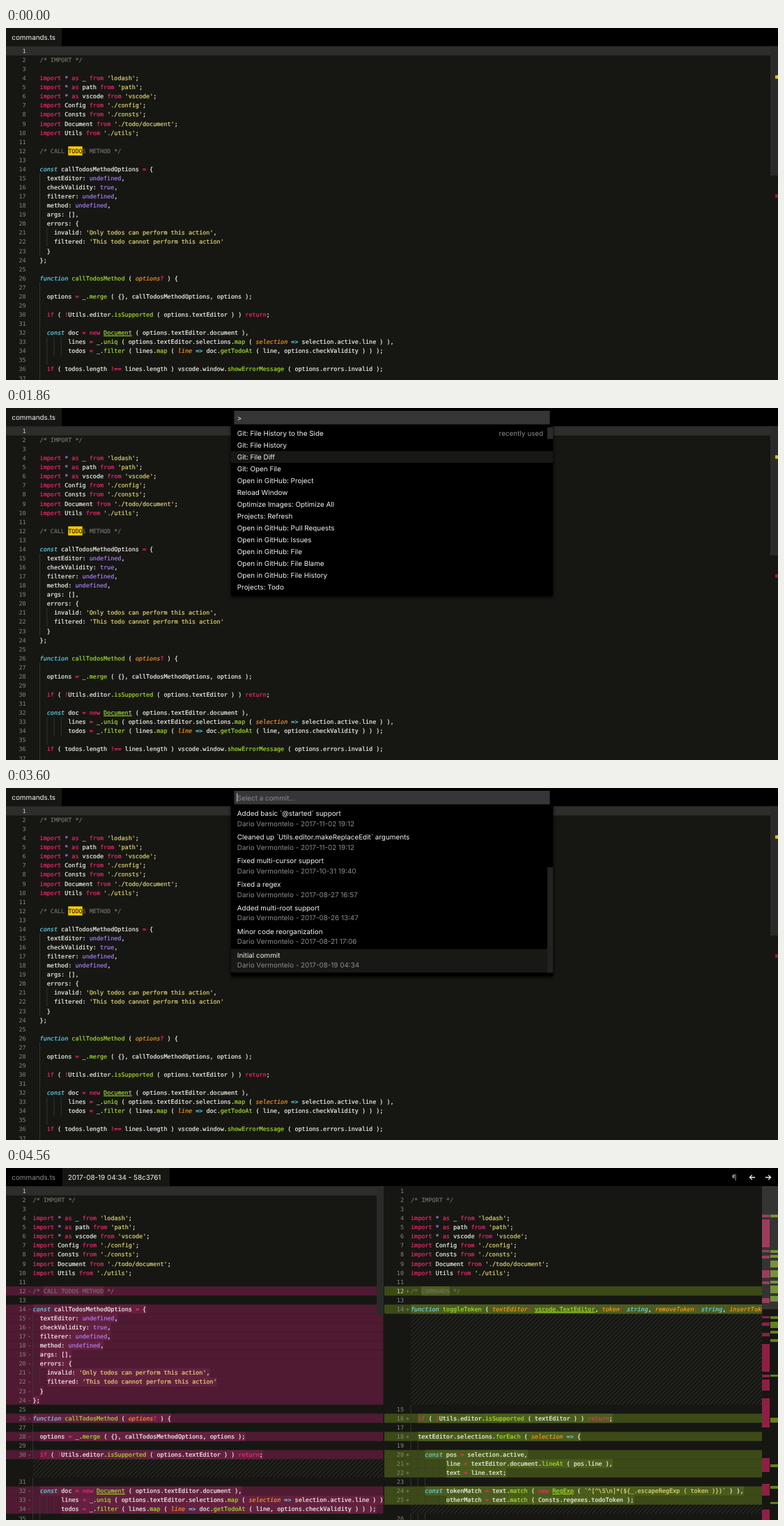
Write an HTML page that moves like this. It is 1108 px wide and 506 px high and loops after 4620 ms.

```html
<!DOCTYPE html>
<html lang="en">
<head>
<meta charset="utf-8">
<title>Comparing a file with an earlier commit</title>
<style>
html, body { margin: 0; width: 100%; height: 100%; overflow: hidden; background: #161713; }
svg { display: block; width: 100%; height: 100%; }
text { white-space: pre; fill: currentColor; text-rendering: geometricPrecision; }
.code { font: 8.45px "DejaVu Sans Mono", monospace; color: #f8f8f2; stroke: currentColor; stroke-width: .18px; }
.code tspan { fill: currentColor; stroke: currentColor; }
.num { font: 8.45px "DejaVu Sans Mono", monospace; color: #85867f; text-anchor: end; }
.num.on { color: #d0d0cc; }
.ui { font: 9.9px Inter, sans-serif; color: #f4f4f4; }
.dim { color: #8c8c8c; }
.c { color: #716f66; }
.s { color: #e6db74; }
.k { color: #f92672; }
.t { color: #66d9ef; font-style: italic; }
.n { color: #ae81ff; }
.u { color: #a6e22e; text-decoration: underline; }
.p { color: #fd971f; font-style: italic; }
.f { color: #a6e22e; }
.todo { color: #2a2405; }
</style>
</head>
<body>
<svg id="stage" viewBox="0 0 1108 506">
  <defs>
    <pattern id="hatch" width="6" height="6" patternUnits="userSpaceOnUse">
      <path d="M-1 1L1 -1M0 6L6 0M5 7L7 5" stroke="#3a3b37" stroke-width=".8"/>
    </pattern>
    <filter id="shadow" x="-5%" y="-5%" width="110%" height="112%">
      <feDropShadow dx="0" dy="2" stdDeviation="2.5" flood-color="#000"/>
    </filter>
    <clipPath id="list"><rect x="323" y="27.5" width="462" height="238.5"/></clipPath>
    <clipPath id="left"><rect y="26" width="542" height="480"/></clipPath>
    <clipPath id="right"><rect x="543" y="26" width="542" height="480"/></clipPath>
  </defs>
</svg>
<script>
const LOOP = 4620;
const ROW = 13.07, TOP = 26.4, CHAR = 5.086;
const BG = '#161713', LINE = '#2d2d2c', SLIDER = '#2a2b29';

const imports = String.raw`
/* IMPORT */

import * as _ from 'lodash';
import * as path from 'path';
import * as vscode from 'vscode';
import Config from './config';
import Consts from './consts';
import Document from './todo/document';
import Utils from './utils';
`;

const current = (imports + String.raw`
/* CALL TODOS METHOD */

const callTodosMethodOptions = {
  textEditor: undefined,
  checkValidity: true,
  filterer: undefined,
  method: undefined,
  args: [],
  errors: {
    invalid: 'Only todos can perform this action',
    filtered: 'This todo cannot perform this action'
  }
};

function callTodosMethod ( options? ) {

  options = _.merge ( {}, callTodosMethodOptions, options );

  if ( !Utils.editor.isSupported ( options.textEditor ) ) return;

  const doc = new Document ( options.textEditor.document ),
        lines = _.uniq ( options.textEditor.selections.map ( selection => selection.active.line ) ),
        todos = _.filter ( lines.map ( line => doc.getTodoAt ( line, options.checkValidity ) ) );

  if ( todos.length !== lines.length ) vscode.window.showErrorMessage ( options.errors.invalid );

`).split('\n');

const earlier = (imports + '\n' + [
  '/* COMMANDS */',
  '',
  'function toggleToken ( textEditor: vscode.TextEditor, token: string, removeToken: string, insertToken: string ) {',
  '',
  '  if ( !Utils.editor.isSupported ( textEditor ) ) return;',
  '',
  '  textEditor.selections.forEach ( selection => {',
  '',
  '    const pos = selection.active,',
  '          line = textEditor.document.lineAt ( pos.line ),',
  '          text = line.text;',
  '',
  '    const tokenMatch = text.match ( new RegExp ( `^[^\\S\\n]*(${_.escapeRegExp ( token )})` ) ),',
  '          otherMatch = text.match ( Consts.regexes.todoToken );',
  '',
  '    if ( tokenMatch ) {',
  '',
  '      const endIndex = tokenMatch.index + tokenMatch[0].length,',
  '            startIndex = endIndex - tokenMatch[1].length,',
  '            space = !removeToken && text.length >= startIndex + 1 && text[startIndex + 1].match ( /\\s/ );',
  '',
  '      Utils.editor.replaceRange ( textEditor, pos.line, removeToken, startIndex, endIndex + space );',
  '',
  '    } else if ( otherMatch ) {',
  '',
  '      const endIndex = otherMatch.index + otherMatch[0].length,'
].join('\n')).split('\n');

const commands = [
  'Git: File History to the Side', 'Git: File History', 'Git: File Diff', 'Git: Open File',
  'Open in GitHub: Project', 'Reload Window', 'Optimize Images: Optimize All', 'Projects: Refresh',
  'Open in GitHub: Pull Requests', 'Open in GitHub: Issues', 'Open in GitHub: File',
  'Open in GitHub: File Blame', 'Open in GitHub: File History', 'Projects: Todo'
];

const author = 'Dario Vermontelo';
const commits = [
  'Minor style improvement|2018-01-18 17:47',
  'Properly getting the path of the currently active document|2017-11-11 12:08',
  'Added basic `Archive` functionalities|2017-11-03 23:27',
  'Refactored some todo-related code|2017-11-02 21:02',
  'Added basic `@started` support|2017-11-02 19:12',
  'Cleaned up `Utils.editor.makeReplaceEdit` arguments|2017-11-02 19:12',
  'Fixed multi-cursor support|2017-10-31 19:40',
  'Fixed a regex|2017-08-27 16:57',
  'Added multi-root support|2017-08-26 13:47',
  'Minor code reorganization|2017-08-21 17:06',
  'Initial commit|2017-08-19 04:34'
].map(c => c.split('|'));

const SYNTAX = new RegExp([
  /(?<c>\/\*.*\*\/)/,
  /(?<s>'[^']*'|`[^`]*`)/,
  /(?<u>(?<=new )\w+|vscode\.TextEditor)/,
  /(?<t>=>|\b(?:const|function|string)\b)/,
  /(?<n>\*|\b(?:undefined|true|\d+)\b)/,
  /(?<p>\w+(?= =>|\?|: (?:vscode|string)))/,
  /(?<k>\b(?:import|from|as|if|else|return|new)\b|:(?= (?:vscode|string))|[=!?+&>-]+)/,
  /(?<f>(?<=\.|function )\w+(?= \())/
].map(r => r.source).join('|'), 'g');

const stage = document.getElementById('stage');

function el(tag, attrs, parent, text) {
  const node = document.createElementNS('http://www.w3.org/2000/svg', tag);
  for (const key in attrs) node.setAttribute(key, attrs[key]);
  if (text !== undefined) node.textContent = text;
  return parent.appendChild(node);
}
const group = (parent, attrs = {}) => el('g', attrs, parent);
const rect = (parent, x, y, width, height, fill) => el('rect', { x, y, width, height, fill }, parent);
const label = (parent, x, y, text, cls = 'ui') => el('text', { x, y, class: cls }, parent, text);
const show = (node, on) => node.setAttribute('display', on ? 'inline' : 'none');
const rowY = row => TOP + row * ROW;

function codeLine(parent, x, y, line, plain) {
  const text = el('text', { x, y, class: 'code' }, parent);
  if (plain) { text.textContent = line; return; }
  let pos = 0;
  for (const m of line.matchAll(SYNTAX)) {
    if (m.index > pos) el('tspan', {}, text, line.slice(pos, m.index));
    const cls = Object.keys(m.groups).find(k => m.groups[k] !== undefined);
    el('tspan', { class: cls }, text, m[0]);
    pos = m.index + m[0].length;
  }
  el('tspan', {}, text, line.slice(pos));
}

// Number of indent guides per line; blank lines follow their neighbours.
function guideLevels(lines) {
  const own = lines.map(l => l.trim() ? l.search(/\S/) >> 1 : -1);
  return own.map((level, i) => {
    if (level >= 0) return level;
    const above = own.slice(0, i).reverse().find(v => v >= 0) ?? 0;
    const below = own.slice(i).find(v => v >= 0) ?? 1;
    return above === below ? below : 1 + Math.min(above, below);
  });
}

function pane(parent, o) {
  const { lines, x, x0, x1, gaps = {}, marks = [], active = 1 } = o;
  const g = group(parent, o.clip ? { 'clip-path': `url(#${o.clip})` } : {});
  const levels = guideLevels(lines);
  let row = 0;
  lines.forEach((line, i) => {
    const n = i + 1, y = rowY(row), base = y + 9.6;
    if (n === active) rect(g, x0, y, x1 - x0, ROW, LINE);
    if (marks.includes(n)) {
      rect(g, x0, y, x1 - x0, ROW + .1, o.tint[0]);
      const part = line.match(/[^\/* ](.*[^\/* ])?/);
      rect(g, x + part.index * CHAR, y, part[0].length * CHAR, ROW + .1, o.tint[1]);
      label(g, x - 7.3, base, o.sign, 'num').style.textAnchor = 'start';
    }
    for (let k = 0; k < levels[i]; k++) rect(g, x + k * 2 * CHAR - .4, y, .8, ROW + .1, '#3b3c37');
    label(g, o.num, base, n, n === active ? 'num on' : 'num');
    codeLine(g, x, base, line, n >= o.plainFrom);
    row++;
    if (gaps[n]) {
      rect(g, x, rowY(row), x1 - x, gaps[n] * ROW, 'url(#hatch)');
      row += gaps[n];
    }
  });
}

const range = (a, b) => Array.from({ length: b - a + 1 }, (_, i) => a + i);

rect(stage, 0, 0, 1108, 506, BG);
rect(stage, 0, 0, 1108, 26, '#000');

// Single editor
const mainTab = group(stage);
rect(mainTab, 0, 0, 80, 26, BG);
label(mainTab, 8.3, 17.4, 'commands.ts');

const mainBody = group(stage);
pane(mainBody, { lines: current, x: 48.6, num: 28.6, x0: 0, x1: 1108 });
rect(mainBody, 48.6 + 8 * CHAR, rowY(11), 4 * CHAR, ROW, '#ffcc00');
label(mainBody, 48.6 + 8 * CHAR, rowY(11) + 9.6, 'TODO', 'code todo');
rect(mainBody, 1097, 26, 11, 186, SLIDER);
rect(mainBody, 1104, 68, 4, 5, '#d9bd1c');
rect(mainBody, 1104, 239, 4, 5, '#8e1c3c');
const mainCaret = rect(mainBody, 48.2, 26.6, 1.5, 12.8, '#f8f8f0');

// Diff editor
const diff = group(stage);
label(diff, 8.3, 17.4, 'commands.ts', 'ui dim');
rect(diff, 81, 0, 154, 26, BG);
label(diff, 88.8, 17.4, '2017-08-19 04:34 - 58c3761');
label(diff, 1041.5, 17.6, '¶', 'ui dim').style.fontSize = '12px';
for (const [x, dir] of [[1071, 1], [1094, -1]])
  el('path', {
    d: `M${x + 4 * dir} 13.5H${x - 3.5 * dir}m${3.3 * dir} -3.4l${-3.4 * dir} 3.4l${3.4 * dir} 3.4`,
    fill: 'none', stroke: '#f0f0f0', 'stroke-width': 1.3
  }, diff);

const leftPane = { lines: current, x: 38.6, num: 28.6, x0: 0, x1: 541.5, clip: 'left' };
const rightPane = { lines: earlier, x: 581, num: 571, x0: 543, x1: 1085, active: 12, clip: 'right' };

const plainDiff = group(diff);
pane(plainDiff, leftPane);
pane(plainDiff, { ...rightPane, plainFrom: 20 });
rect(plainDiff, 1085, 26, 23, 291, '#30312f');

const tintedDiff = group(diff);
pane(tintedDiff, {
  ...leftPane, gaps: { 30: 2 }, sign: '-', tint: ['#4f1a32', '#63213f'],
  marks: [12, ...range(14, 24), 26, 28, 30, 32, 33, 34]
});
pane(tintedDiff, {
  ...rightPane, gaps: { 14: 10, 25: 1 }, sign: '+', tint: ['#3c4a17', '#4b5d1d'],
  marks: [12, 14, 16, 18, 20, 21, 22, 24, 25]
});
const removed = [[67, 4], [74, 40], [118, 3], [126, 4], [147, 11], [163, 4], [187, 7], [213, 3], [222, 5],
  [237, 5], [253, 40], [297, 4], [304, 16], [331, 42], [417, 20], [454, 17], [491, 15]];
const added = [[67, 4], [118, 4], [125, 4], [133, 10], [147, 10], [162, 4], [169, 11], [184, 8], [213, 4],
  [221, 9], [234, 4], [246, 4], [297, 3], [359, 7], [426, 4], [457, 4], [480, 3]];
for (const [y, h] of removed) rect(tintedDiff, 1085, y, 11, h, '#8f1f45');
for (const [y, h] of added) rect(tintedDiff, 1097, y, 11, h, '#64801f');
rect(tintedDiff, 1085, 26, 23, 177, 'rgba(255,255,255,.13)');

rect(diff, 532, 26, 10, 186, SLIDER);
const diffCaret = rect(diff, 580.8, rowY(11) + .2, 1.5, 12.8, '#f8f8f0');

// Quick pick boxes
function picker(caretX) {
  const box = group(stage);
  rect(box, 323, 0, 462, 270, '#000').setAttribute('filter', 'url(#shadow)');
  rect(box, 327.5, 4, 453, 19.5, '#363636');
  const list = group(box, { 'clip-path': 'url(#list)' });
  const rows = group(list);
  return { box, list, rows, caret: rect(box, caretX, 7.5, .9, 12.5, '#e8e8e8') };
}

const CMD_H = 16.96, COMMIT_H = 33.9, LIST_Y = 28;

const palette = picker(339.5);
label(palette.box, 331.8, 17.6, '>');
const cmdPick = rect(palette.rows, 323, LIST_Y, 462, CMD_H, '#171814');
commands.forEach((name, i) => label(palette.rows, 331.8, 40.2 + i * CMD_H, name));
label(palette.rows, 771, 40.2, 'recently used', 'ui dim').style.textAnchor = 'end';
rect(palette.list, 777, 27.5, 8, 17, '#2b2b2a');

const log = picker(331.3);
label(log.box, 331.8, 17.6, 'Select a commit...', 'ui dim');
const commitPick = rect(log.rows, 323, LIST_Y, 462, COMMIT_H, '#181915');
commits.forEach(([title, date], i) => {
  const y = 40.2 + i * COMMIT_H;
  label(log.rows, 331.8, y, title);
  label(log.rows, 331.8, y + 14.7, `${author} - ${date}`, 'ui dim');
});
const thumb = rect(log.list, 777, 27.5, 8, 151.5, '#222321');

const within = (t, a, b) => t >= a && t < b;
const blink = (t, since) => Math.floor((t - since) / 500) % 2 === 0;

const OPEN = 300, CHOSEN = 2280, LISTED = 2520, PICKED = 3720, BLANK = 3780, DIFF = 3900, TINTED = 4200;

function draw(t) {
  show(mainTab, t < DIFF);
  show(mainBody, t < BLANK);
  show(mainCaret, within(t, CHOSEN, LISTED) || t >= PICKED);

  show(palette.box, within(t, OPEN, CHOSEN));
  show(palette.caret, blink(t, OPEN));
  const cmd = t < 1620 ? 0 : t < 1800 ? 1 : 2;
  cmdPick.setAttribute('y', LIST_Y + cmd * CMD_H);

  show(log.box, within(t, LISTED, PICKED));
  show(log.caret, blink(t, LISTED));
  const pick = Math.max(0, Math.min(10, Math.floor((t - 2950) / 55)));
  const scroll = Math.max(0, pick - 6);
  commitPick.setAttribute('y', LIST_Y + pick * COMMIT_H);
  log.rows.setAttribute('transform', `translate(0 ${-scroll * COMMIT_H})`);
  thumb.setAttribute('y', 27.5 + scroll * 21.6);
  show(thumb, scroll > 0);

  show(diff, t >= DIFF);
  show(plainDiff, t < TINTED);
  show(tintedDiff, t >= TINTED);
  show(diffCaret, blink(t, DIFF));
}

const start = performance.now();
function tick() {
  draw((performance.now() - start) % LOOP);
  requestAnimationFrame(tick);
}
draw(0);
requestAnimationFrame(tick);
</script>
</body>
</html>
```
